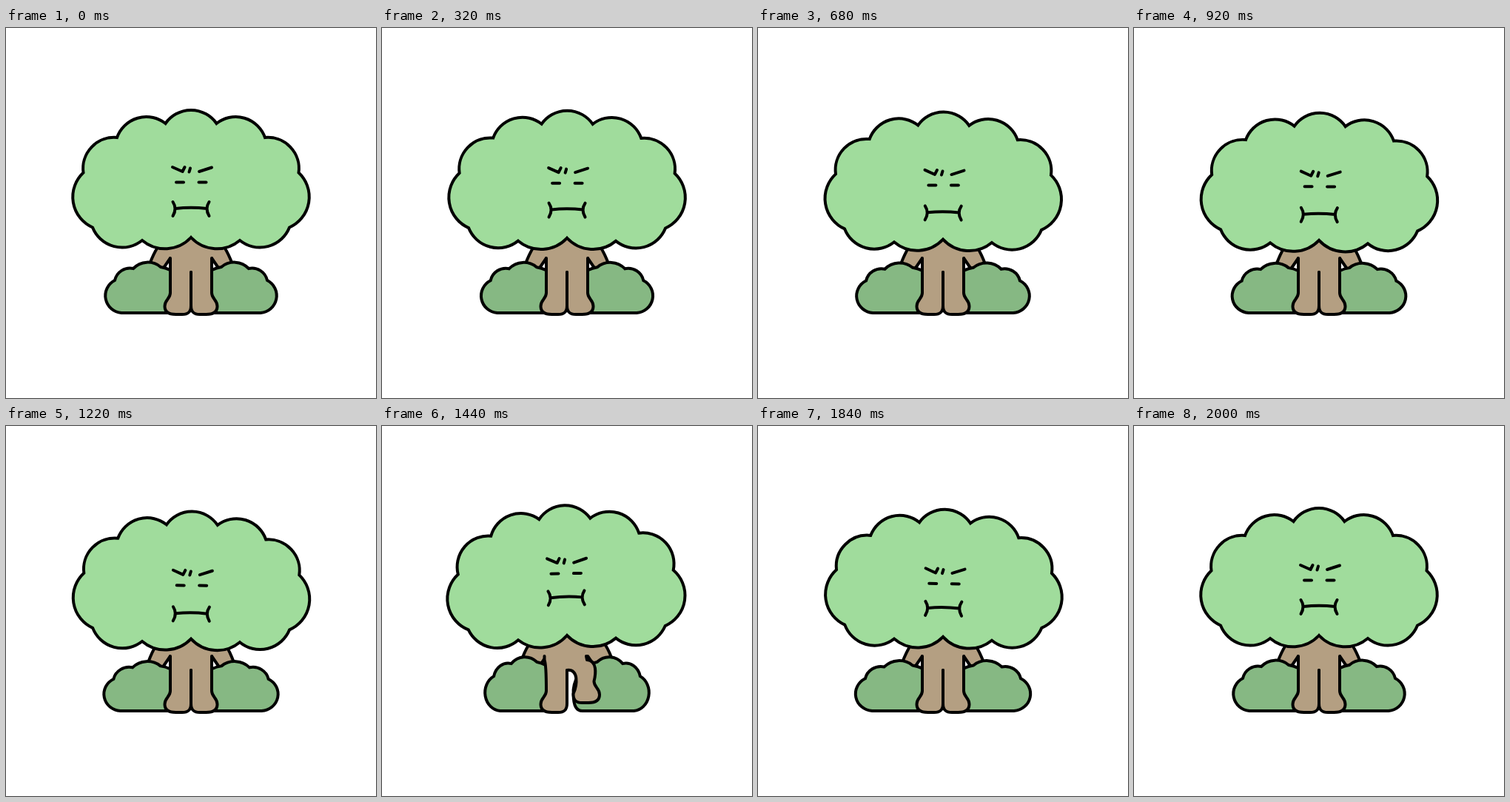
Write an HTML page with a canvas that moves like this. It is 500 px wide and 500 px high and loops after 2020 ms.

```html
<!DOCTYPE html>
<html lang="en">
<head>
<meta charset="utf-8">
<title>Grumpy tree</title>
<style>
html, body { margin: 0; width: 100%; height: 100%; overflow: hidden; background: #fff; }
canvas { display: block; width: 100%; height: 100%; }
</style>
</head>
<body>
<canvas id="stage" width="500" height="500"></canvas>
<script>
const ctx = document.getElementById('stage').getContext('2d');
const LOOP = 2020, STEP = 20;
const MID = 250, PIVOT = 285, GROUND = 385;
const LEAF = '#a0dc9c', BUSH = '#86b883', BARK = '#b49f82';

// y, tilt, tall, droop move the crown; face and chin move the features on it.
const rest = { y: 0, tilt: 0, tall: 1, droop: 0, face: 0, chin: 0, bushX: 1, bushY: 1, arms: 0, lift: 0 };
const slump = { ...rest, y: 4.6, tilt: .009, face: 7, chin: 2.5, bushX: 1.024, bushY: .978, arms: 2 };
const raise = { y: 0, tilt: -.02, tall: 1.025, droop: 4, face: -9.2, chin: -3, bushX: .94, bushY: 1.065, arms: 7, lift: 1 };
const stomp = { ...rest, y: 3, tilt: .027, droop: -1, face: 7.7, chin: -4, bushX: 1.05, bushY: .988, arms: -2 };

const KEYS = [[0, rest], [1240, slump], [1440, raise], [1620, raise], [1720, stomp], [2000, rest], [LOOP, rest]];

const smooth = u => u * u * (3 - 2 * u);

function poseAt(t) {
  const i = KEYS.findIndex(([end]) => t < end);
  const [t0, a] = KEYS[i - 1], [t1, b] = KEYS[i];
  const k = smooth((t - t0) / (t1 - t0));
  return Object.fromEntries(Object.keys(a).map(n => [n, a[n] + (b[n] - a[n]) * k]));
}

function fill(path, color) {
  ctx.fillStyle = color;
  ctx.fill(new Path2D(path));
}

const line = path => ctx.stroke(new Path2D(path));

function mirrored(draw) {
  ctx.save();
  ctx.translate(2 * MID, 0);
  ctx.scale(-1, 1);
  draw();
  ctx.restore();
}

function bothSides(draw) {
  draw();
  mirrored(draw);
}

function arm({ arms }) {
  const x = 204.5 - arms, hand = 194 - arms * .9;
  const outer = `${x} 297 Q${x - 5} 305 ${hand} 319 L${hand - 3} 332`;
  fill(`M250 280 L${x} 290 L${outer} L208 332 L222 311 H250Z`, BARK);
  line(`M${x + 2} 290 L${outer} M222 311 L209 330`);
}

const bushShape = new Path2D('M230 385 H156 A23.3 23.3 0 0 1 147 341 A21 21 0 0 1 172 325' +
  'A27 27 0 0 1 209 323 A40 40 0 0 1 243 358 V364 Q243 385 230 385Z');

// Scales the outline only, so that the stroke keeps its width.
function bush({ bushX, bushY }) {
  const p = new Path2D();
  p.addPath(bushShape, new DOMMatrix([bushX, 0, 0, bushY, 216 * (1 - bushX), GROUND * (1 - bushY)]));
  ctx.fillStyle = BUSH;
  ctx.fill(p);
  ctx.stroke(p);
}

function legPath(k, hip) {
  const dx = 8.5 * k, dy = -13 * k;
  const foot = 'c0 8 3 12 12 12 h8.5 c10 0 15 -4 15 -11 c0 -9 -7.5 -10 -7.5 -18';
  return `M250 330 C${250 + 16 * k} ${345 - 17 * k} ${250 + 14 * k} 350 ${250 + dx} ${375 + dy}` + foot +
    `C${278 + 11 * k} ${345 - 10 * k} ${278 + 13 * k} ${322 - 5 * k} ${hip + k} 316 L${hip} 311`;
}

function legs({ lift }) {
  const right = legPath(lift, 278 - 2 * lift);
  const left = legPath(0, 278 + 2.5 * lift);
  const top = ' L276 280 H250Z';
  fill(right + top, BARK);
  mirrored(() => fill(left + top, BARK));
  line(right);
  mirrored(() => line(left));
}

// Notches and lobe radii down the right half; the left half mirrors them.
const NOTCH = [[34.5, 129], [100, 148], [145.5, 195.5], [133, 269.5], [66, 287], [0, 283]];
const LOBE = [42, 42, 45, 43, 48];
const notches = [...NOTCH, ...NOTCH.slice(0, -1).reverse().map(([x, y]) => [-x, y])];
const lobes = [...LOBE, ...LOBE.slice().reverse(), 42];

function crown({ tall, droop }) {
  const pts = notches.map(([x, y]) =>
    `${MID + x} ${PIVOT + (y - PIVOT) * tall + droop * (x / 140) ** 2}`);
  const path = `M${pts[0]}` + lobes.map((r, i) =>
    `A${r} ${r} 0 0 1 ${pts[(i + 1) % pts.length]}`).join('') + 'Z';
  fill(path, LEAF);
  line(path);
}

function face({ chin }) {
  line('M225 188 L238.5 194 L241.5 188 M247.5 194.5 L249 189.5 M261 194 L278 188.5');
  line('M230 208.5 H240 M260.5 208.5 H270.5');
  ctx.translate(0, chin);
  line('M229 244 Q250 241.5 271.5 244 M225.5 235 Q231.5 244 225.5 254 M274.5 235 Q268.5 244 274.5 254');
}

function tilted(pose, dy, draw) {
  ctx.save();
  ctx.translate(MID, PIVOT + dy);
  ctx.rotate(pose.tilt);
  ctx.translate(-MID, -PIVOT);
  draw(pose);
  ctx.restore();
}

function draw(t) {
  const pose = poseAt(t);
  ctx.fillStyle = '#fff';
  ctx.fillRect(0, 0, 500, 500);
  ctx.lineWidth = 4;
  ctx.lineCap = 'round';

  ctx.lineJoin = 'miter';
  bothSides(() => arm(pose));
  bothSides(() => bush(pose));
  ctx.lineJoin = 'round';
  legs(pose);
  ctx.lineJoin = 'miter';
  tilted(pose, pose.y, crown);
  ctx.lineJoin = 'round';
  tilted(pose, pose.face, face);
}

function tick() {
  const t = performance.now() % LOOP;
  draw(Math.floor(t / STEP) * STEP);
  requestAnimationFrame(tick);
}
tick();
</script>
</body>
</html>
```
